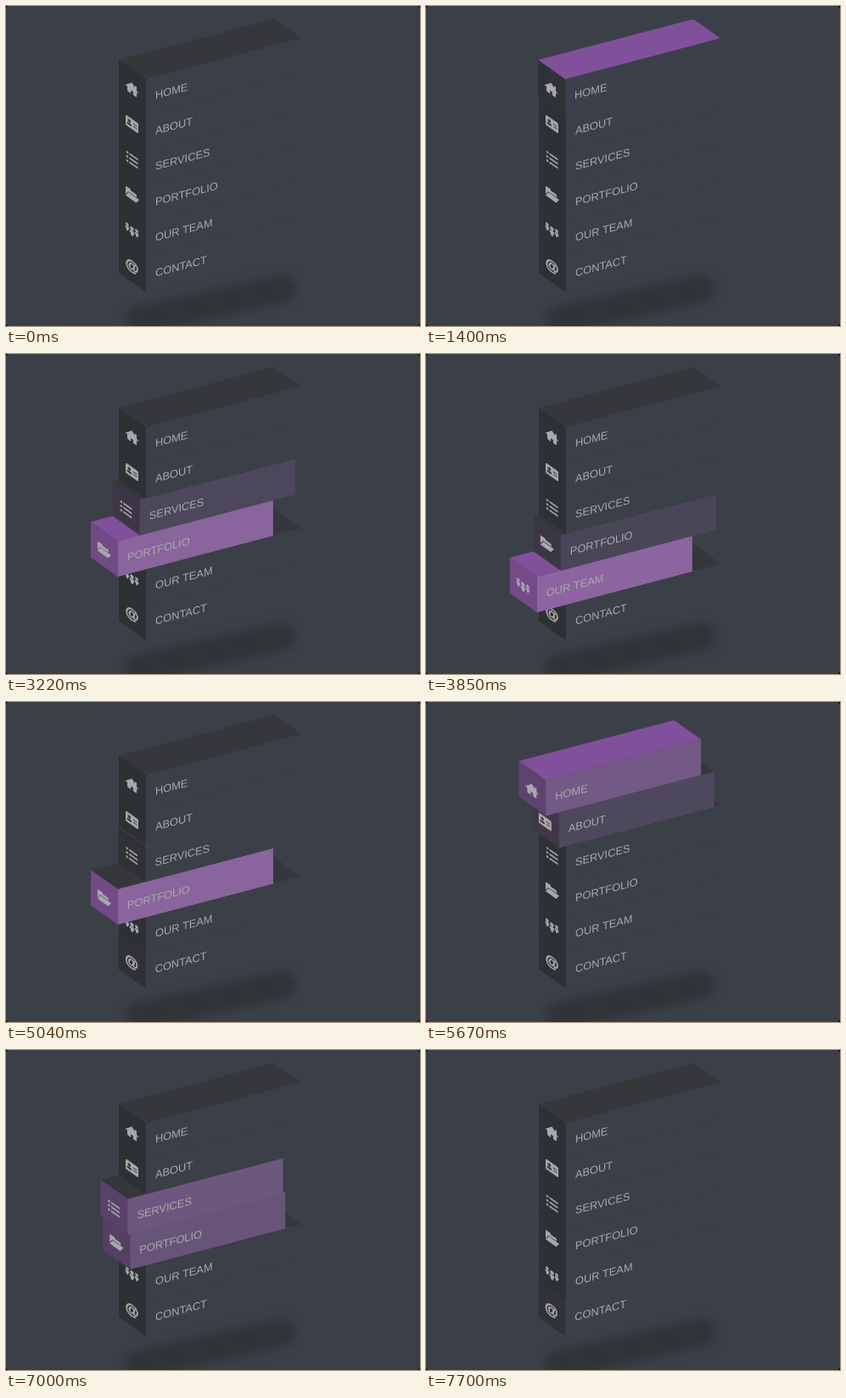
An HTML page with a canvas for the animation above (8.26 s loop, 488 by 378 pixels).

```html
<!DOCTYPE html>
<html lang="en">
<head>
<meta charset="utf-8">
<title>Isometric menu</title>
<style>
  html, body { margin: 0; width: 100%; height: 100%; overflow: hidden; background: #000; }
  canvas { display: block; border-radius: 4px; }
</style>
</head>
<body>
<canvas id="stage" width="488" height="378"></canvas>
<script>
const ctx = document.getElementById('stage').getContext('2d');

const LOOP = 8260, TICK = 70, DURATION = 500;
const LEFT = 165, TOP = 86.3, WIDTH = 183, ROW = 42, DEPTH = 32;
const SLOPE = 0.264, SIDE_SLOPE = 0.71, SLIDE = 40.3;
const BACKGROUND = '#3b4048', ICON = '#a6a8aa', LABEL = '#a9a9ab';
const TOP_REST = '#35373b', TOP_HOVER = '#81509b';
const FRONT = ['#3b3f47', '#9a6cb0'], SIDE = ['#2e3134', '#814f98'];

// Pointer path as [time, row entered]; rows in between are crossed at even speed.
const path = [
  [1380, 0], [2002, 1], [2960, 3], [3575, 4], [4080, 5], [4600, 4], [4765, 3],
  [5030, 2], [5500, 0], [6158, 1], [6370, 2], [6862, 3], [7440, 6]
];
const visits = path.flatMap(([start, row], i) => {
  const [end, next] = path[i + 1] || [LOOP, row + 1];
  const steps = Math.abs(next - row);
  return Array.from({ length: steps }, (_, n) => ({
    row: row + n * Math.sign(next - row),
    enter: start + (end - start) * n / steps,
    leave: start + (end - start) * (n + 1) / steps
  }));
});

// CSS "ease": cubic-bezier(.25, .1, .25, 1)
function ease(x) {
  if (x <= 0) return 0;
  if (x >= 1) return 1;
  let low = 0, high = 1, u;
  for (let i = 0; i < 24; i++) {
    u = (low + high) / 2;
    if (0.75 * u * (1 - u) + u ** 3 < x) low = u; else high = u;
  }
  return 0.3 * u * (1 - u) ** 2 + 3 * u * u * (1 - u) + u ** 3;
}

// An interrupted slide returns in proportionally less time.
function rowState(row, time) {
  const visit = visits.findLast(v => v.row === row && v.enter <= time);
  if (!visit) return { amount: 0, hovered: false };
  const hovered = time < visit.leave;
  const peak = ease((Math.min(time, visit.leave) - visit.enter) / DURATION);
  const amount = peak * (1 - ease((time - visit.leave) / (DURATION * peak)));
  return { amount: hovered ? peak : amount, hovered };
}

const mix = ([rest, full], p) => `color-mix(in srgb, ${full} ${p * 100}%, ${rest})`;

function poly(color, ...points) {
  ctx.fillStyle = color;
  ctx.beginPath();
  points.forEach(([x, y]) => ctx.lineTo(x, y));
  ctx.closePath();
  ctx.fill();
}

function box(color, x, y, w, h, r = 0) {
  ctx.fillStyle = color;
  ctx.beginPath();
  ctx.roundRect(x, y, w, h, r);
  ctx.fill();
}

function dot(color, x, y, r) {
  box(color, x - r, y - r, 2 * r, 2 * r, r);
}

function write(text, x, y, font, color) {
  ctx.fillStyle = color;
  ctx.font = `${font} "Liberation Sans", Arial, sans-serif`;
  ctx.fillText(text, x, y);
}

// Icons are centred on the origin; "hole" is the colour of the face behind.
function home(hole) {
  poly(ICON, [-8, 1], [0, -7], [8, 1]);
  box(ICON, 3.5, -6, 2, 5);
  box(ICON, -5.5, 0, 11, 6.5, 1);
  box(hole, -1.4, 3, 2.8, 4);
}

function card(hole) {
  box(ICON, -7.5, -6, 15, 12, 1.5);
  dot(hole, -3.2, -1.7, 1.8);
  box(hole, -6, 0.8, 5.6, 2.6, 1.2);
  for (const y of [-2, 1]) box(hole, 1.4, y, 4.4, 1);
}

function list() {
  for (const y of [-5, 0, 5]) {
    dot(ICON, -5.5, y, 1.3);
    box(ICON, -3, y - 1, 10, 2);
  }
}

function folder(hole) {
  box(ICON, -7.5, -6, 6, 4, 1);
  box(ICON, -7.5, -4.5, 13, 9, 1);
  poly(hole, [-4.5, -1.5], [9, -1.5], [9, 5], [-8, 5]);
  poly(ICON, [-4, -0.7], [8.5, -0.7], [5, 5.3], [-7.5, 5.3]);
}

function person(x, y, size) {
  dot(ICON, x, y - 2.6 * size, 2.2 * size);
  box(ICON, x - 2.7 * size, y, 5.4 * size, 3.4 * size, 1.4 * size);
  box(ICON, x - 1.4 * size, y + 2 * size, 2.8 * size, 4 * size, size);
}

function team() {
  person(-5.6, -1.6, 0.85);
  person(5.6, -1.6, 0.85);
  person(0, 0, 1);
}

function at() {
  write('@', -7.8, 4.6, 'bold 16px', ICON);
  ctx.strokeStyle = ICON;
  ctx.lineWidth = 0.6;
  ctx.strokeText('@', -7.8, 4.6);
}

const rows = [
  ['HOME', home], ['ABOUT', card], ['SERVICES', list],
  ['PORTFOLIO', folder], ['OUR TEAM', team], ['CONTACT', at]
];

function drawRow(index, time) {
  const [label, icon] = rows[index];
  const { amount, hovered } = rowState(index, time);
  const shift = SLIDE * amount;
  const x = LEFT - shift, y = TOP + index * ROW + shift * SLOPE;
  const rise = WIDTH * SLOPE, back = DEPTH * SIDE_SLOPE;

  poly(hovered ? TOP_HOVER : TOP_REST,
    [x, y], [x + WIDTH, y - rise], [x + WIDTH - DEPTH, y - rise - back], [x - DEPTH, y - back]);

  const side = mix(SIDE, amount);
  ctx.setTransform(1, SIDE_SLOPE, 0, 1, x, y);
  box(side, -DEPTH, 0, DEPTH, ROW);
  ctx.translate(-16.5, 23);
  icon(side);

  ctx.setTransform(1, -SLOPE, 0, 1, x, y);
  box(mix(FRONT, amount), 0, 0, WIDTH, ROW);
  write(label, 11, 26.4, '12.8px', LABEL);
  ctx.resetTransform();
}

function drawShadow() {
  ctx.filter = 'blur(6px)';
  ctx.strokeStyle = '#303338';
  ctx.lineWidth = 32;
  ctx.lineCap = 'round';
  ctx.beginPath();
  ctx.moveTo(157, 371);
  ctx.lineTo(325, 334);
  ctx.stroke();
  ctx.filter = 'none';
}

function draw(time) {
  box(BACKGROUND, 0, 0, 488, 378);
  drawShadow();
  for (let i = rows.length - 1; i >= 0; i--) drawRow(i, time);
}

function frame() {
  const time = performance.now() % LOOP;
  draw(Math.floor(time / TICK) * TICK);
  requestAnimationFrame(frame);
}
frame();
</script>
</body>
</html>
```
